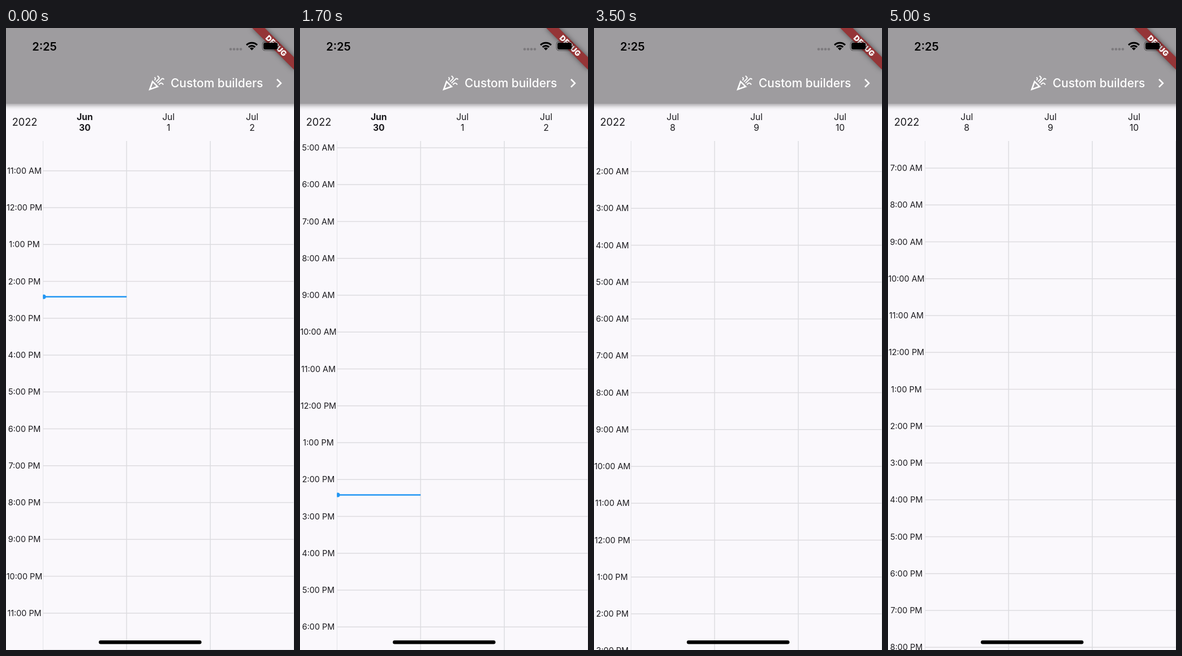
These frames come from a looping animation (509 px wide and 1101 px high, 5200 ms). An HTML page with a canvas:

```html
<!DOCTYPE html>
<html lang="en">
<head>
<meta charset="utf-8">
<title>Calendar planner</title>
<style>
  html, body { margin: 0; width: 100%; height: 100%; overflow: hidden; background: #faf8fc; }
  canvas { display: block; }
</style>
</head>
<body>
<canvas id="stage" width="509" height="1101"></canvas>
<script>
const ctx = document.getElementById('stage').getContext('2d');
const W = 509, H = 1101, LOOP = 5200, STEP = 100;
const LEFT = 65.25, TOP = 200, BAR = 134;
const HOUR = 65.25, DAY = (W - LEFT) / 3, PT = 1.305;
const INK = '#1b1a1e', GRID = '#dddce0', BLUE = '#2196f3';

// Vertical scroll as [time, offset]; zero means the day's end touches the stage bottom.
const SCROLL = [
  [600, 0], [1000, -57.5], [1700, 350.75], [3400, 350.75], [3500, 588.5],
  [3600, 676], [3700, 700], [4400, -49.25], [5000, 256.25]
];

function scrollAt(t) {
  if (t <= SCROLL[0][0]) return SCROLL[0][1];
  const next = SCROLL.findIndex(key => key[0] >= t);
  if (next < 0) return SCROLL[SCROLL.length - 1][1];
  const [t0, a] = SCROLL[next - 1], [t1, b] = SCROLL[next];
  return a + (b - a) * (1 - Math.cos(Math.PI * (t - t0) / (t1 - t0))) / 2;
}

// Days swiped: a quick drag, then a fling that settles on the eighth day.
function daysAt(t) {
  if (t <= 2100) return 0;
  if (t < 2400) return 3 * ((t - 2100) / 300) ** 1.7;
  if (t < 3300) return 8 - 5 * (1 - (t - 2400) / 900) ** 3.11;
  return 8;
}

function text(str, x, y, size, weight = 400, color = INK, align = 'center') {
  ctx.font = `${weight} ${size}px Inter, "Liberation Sans", sans-serif`;
  ctx.textAlign = align;
  ctx.fillStyle = color;
  ctx.fillText(str, x, y);
}

function line(x0, y0, x1, y1, color, width) {
  ctx.strokeStyle = color;
  ctx.lineWidth = width;
  ctx.beginPath();
  ctx.moveTo(x0, y0);
  ctx.lineTo(x1, y1);
  ctx.stroke();
}

function disc(x, y, r, color) {
  ctx.fillStyle = color;
  ctx.beginPath();
  ctx.arc(x, y, r, 0, 2 * Math.PI);
  ctx.fill();
}

function pill(x, y, w, h, r, color) {
  ctx.fillStyle = color;
  ctx.beginPath();
  ctx.roundRect(x, y, w, h, r);
  ctx.fill();
}

function clipped(x, y, w, h, draw) {
  ctx.save();
  ctx.beginPath();
  ctx.rect(x, y, w, h);
  ctx.clip();
  draw();
  ctx.restore();
}

function hourLabel(h) {
  return `${h % 12 || 12}:00 ${h < 12 ? 'AM' : 'PM'}`;
}

function drawCalendar(offset, days) {
  const hourY = h => H - (24 - h) * HOUR + offset;
  const dayX = d => LEFT + (d - days) * DAY;
  const first = Math.floor(days);
  const top = Math.max(TOP, hourY(0)), bottom = Math.min(H, hourY(24));

  clipped(0, TOP, LEFT, H - TOP, () => {
    for (let h = 1; h < 24; h++) text(hourLabel(h), 32.5, hourY(h) + 5.2, 14.4);
  });

  clipped(LEFT, top, W - LEFT, bottom - top, () => {
    for (let h = 0; h <= 24; h++) line(LEFT, hourY(h), W, hourY(h), GRID, 1.5);
    for (let d = first; d <= first + 4; d++) line(dayX(d), top, dayX(d), bottom, GRID, 1.5);
    const now = hourY(14 + 25 / 60);
    line(dayX(0), now, dayX(1), now, BLUE, 2.6);
    disc(dayX(0) + 1.3, now, 4, BLUE);
  });

  text('2022', 33, 173, 18.2);
  clipped(LEFT, BAR, W - LEFT, TOP - BAR, () => {
    for (let d = first; d <= first + 3; d++) {
      const x = dayX(d + 0.5), weight = d ? 400 : 700;
      text(d ? 'Jul' : 'Jun', x, 163, 15.66, weight);
      text(d || 30, x, 181.5, 15.66, weight);
    }
  });
}

const cone = new Path2D('M2 22l14-5-9-9zM12.35 16.18L5.3 18.7l2.52-7.05z');
const streamers = new Path2D(
  'M14 12l5.6-5.6c.8-.8 2-.8 2.8 0l.6.6M10 8l.6-.6c.8-.8.8-2 0-2.8l-.6-.6' +
  'M16 14l1.6-1.6c.8-.8 2-.8 2.8 0l1.6 1.6M12 10l3.6-3.6c.8-.8.8-2 0-2.8l-1.6-1.6');
const chevron = new Path2D('M9.3 6.7l5.3 5.3-5.3 5.3');

function icon(x, y, draw) {
  ctx.save();
  ctx.translate(x, y);
  ctx.scale(PT, PT);
  ctx.fillStyle = ctx.strokeStyle = '#fff';
  draw();
  ctx.restore();
}

function drawAppBar() {
  ctx.save();
  ctx.shadowColor = 'rgba(0,0,0,.38)';
  ctx.shadowBlur = 8;
  ctx.shadowOffsetY = 3;
  ctx.fillStyle = '#9e9c9f';
  ctx.fillRect(-20, -20, W + 40, BAR + 20);
  ctx.restore();

  icon(249.4, 82, () => {
    ctx.fill(cone, 'evenodd');
    ctx.lineWidth = 1.5;
    ctx.stroke(streamers);
  });
  text('Custom builders', 291, 105, 20.9, 500, '#fff', 'left');
  icon(466.8, 82, () => {
    ctx.lineWidth = 2;
    ctx.stroke(chevron);
  });
}

function drawBanner() {
  ctx.save();
  ctx.translate(W, 0);
  ctx.rotate(Math.PI / 4);
  const box = [-40 * PT, 28 * PT, 80 * PT, 12 * PT];
  ctx.save();
  ctx.shadowColor = 'rgba(0,0,0,.5)';
  ctx.shadowBlur = 10;
  ctx.fillStyle = '#953537';
  ctx.fillRect(...box);
  ctx.restore();
  text('DEBUG', 0, 34 * PT + 4.8, 13.3, 900, '#fff');
  ctx.restore();
}

function drawStatus() {
  text('2:25', 68, 40, 20, 600, '#000');
  for (let i = 0; i < 4; i++) disc(397 + i * 6, 37.5, 2.3, '#7c7a7d');

  const from = -Math.PI * 0.75, to = -Math.PI * 0.25;
  ctx.strokeStyle = '#000';
  ctx.lineWidth = 3;
  for (const r of [2.5, 8, 13.3]) {
    ctx.lineWidth = r < 3 ? 5 : 3;
    ctx.beginPath();
    ctx.arc(434.5, 39.5, r, from, to);
    ctx.stroke();
  }

  ctx.strokeStyle = 'rgba(0,0,0,.4)';
  ctx.lineWidth = 1.3;
  ctx.beginPath();
  ctx.roundRect(453.2, 24.2, 29, 15.6, 4.5);
  ctx.stroke();
  pill(455, 26, 25.4, 12, 3, '#000');
  pill(483.8, 29.5, 1.8, 5, 1, 'rgba(0,0,0,.4)');
}

function frame(now) {
  const t = Math.floor((now % LOOP) / STEP) * STEP;
  ctx.fillStyle = '#faf8fc';
  ctx.fillRect(0, 0, W, H);
  drawCalendar(scrollAt(t), daysAt(t));
  drawAppBar();
  drawBanner();
  drawStatus();
  pill(164, 1084, 181.5, 6.5, 3.25, '#000');
  requestAnimationFrame(frame);
}
requestAnimationFrame(frame);
</script>
</body>
</html>
```
